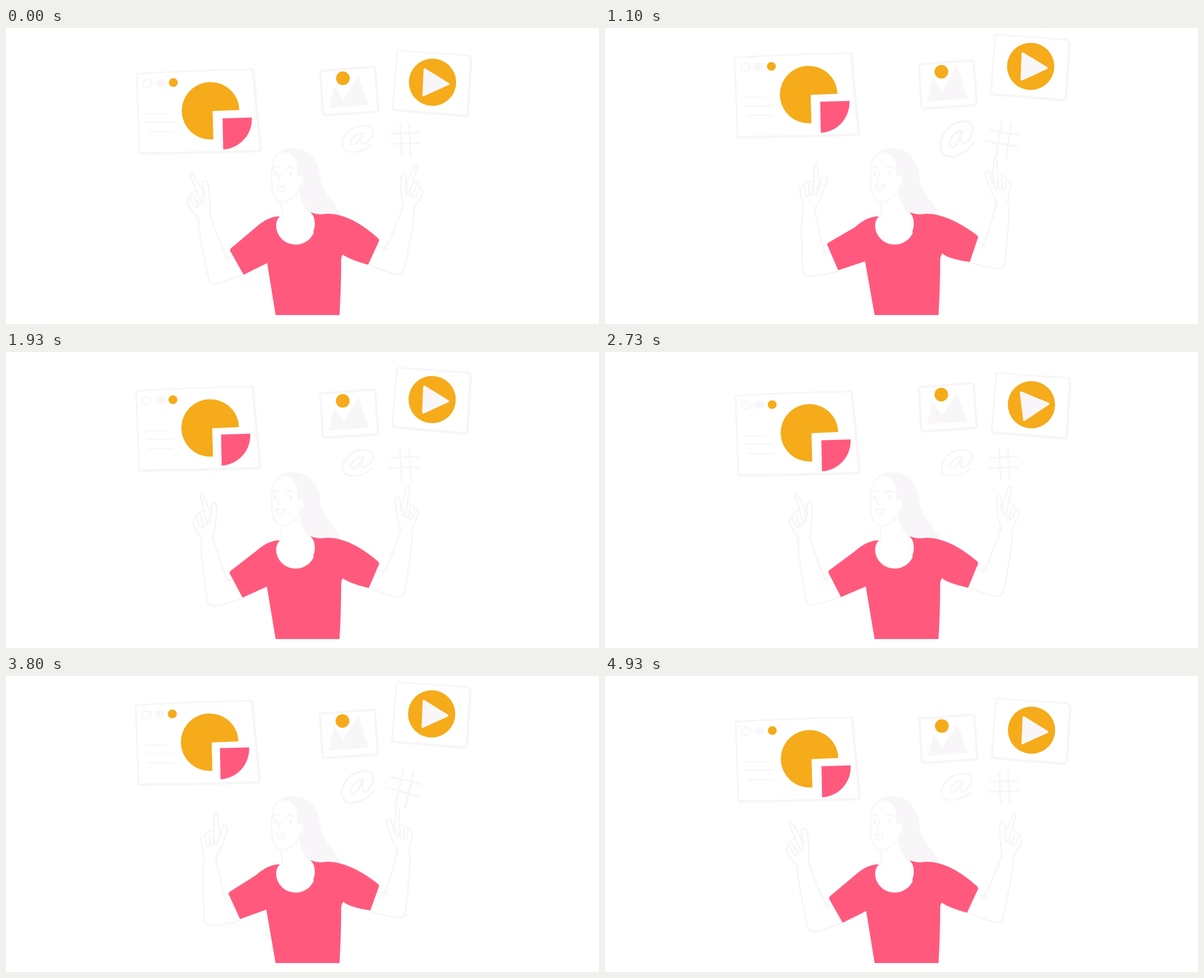
These frames come from a looping animation (1058 by 529 pixels, 5010 ms). An HTML page:

```html
<!DOCTYPE html>
<html lang="en">
<head>
<meta charset="utf-8">
<title>Floating media cards</title>
<style>
  html, body { margin: 0; width: 100%; height: 100%; overflow: hidden; background: #fff; }
  svg { display: block; width: 100%; height: 100%; }
  .line { fill: none; stroke: #f7f6f7; stroke-width: 3; stroke-linecap: round; stroke-linejoin: round; }
  .thick { stroke-width: 4.6; }
  .thin { stroke-width: 2.3; }
  .pale { fill: #f8f6f8; }
  .gold { fill: #f5ab1a; }
  .pink { fill: #ff5a7d; }
  .white { fill: #fff; }
</style>
</head>
<body>
<svg viewBox="0 0 1058 529">
  <g id="windowCard">
    <path class="line" d="M233 82L238 223M232 82Q300 77 438 74"/>
    <path class="line thick" d="M438 74Q441 74 441 78L454 214Q456 220 449 220L330 223L239 224"/>
    <ellipse class="line thin" cx="252" cy="99" rx="8" ry="7"/>
    <ellipse class="pale" cx="276" cy="98" rx="8.5" ry="7.5"/>
    <ellipse class="gold" cx="298.5" cy="97.5" rx="8" ry="7.7"/>
    <path class="line thin" d="M250 153H288M252 168H299M257 185H299"/>
    <path class="gold" d="M416.3 146.5A51.3 51.3 0 1 0 370 199L368.5 148.5Z"/>
    <path id="wedge" class="pink" d="M386.5 161.5L438.5 160A54 54 0 0 1 387.5 217Z"/>
  </g>

  <g id="imageCard">
    <path class="line" style="stroke-width:4" d="M561 77L652 70Q658 69 659 75L664 146Q664 150 660 150L570 156Q566 156 565 150Z"/>
    <path id="peaks" class="pale" d="M-35 2L-25-36L-9-13L18-54L36-3Z"/>
    <circle class="gold" cx="601" cy="90" r="12.2"/>
  </g>

  <g id="playCard">
    <path class="line" d="M690 144L698 42Q700 39 710 41L825 49"/>
    <path class="line thick" d="M824 49Q830 51 830 58L824 153Q823 158 817 157L695 147Q690 146 691 141"/>
    <circle class="gold" cx="761" cy="97" r="42.2"/>
    <path id="play" d="M28 3L-14-23L-16 23Z" fill="#f8f6f8" stroke="#f8f6f8" stroke-width="4" stroke-linejoin="round"/>
  </g>

  <path id="at" class="line" d="M11-9C3-14-12-2-13 6C-13 13-4 11 0 5C4-1 8-8 10-10C7-2 4 8 9 9C16 9 26-2 27-12C27-25 4-26-10-18C-26-8-32 10-24 19C-16 28 12 23 24 10"/>
  <path id="hash" class="line" d="M-8-28L-5 28M8-29L11 28M-23-12L25-14M-26 6L26 5"/>

  <g id="leftArm" class="line">
    <g id="forearm">
      <path d="M-29-100Q-26-70-20-44Q-15-15-10 4Q-7 13 2 12Q20 9 52-5"/>
      <path d="M-8-110Q-3-92 5-75Q15-50 20-41L28-30M19-33L34-38"/>
    </g>
    <g id="leftHand">
      <g id="hand">
        <path d="M10-49L11-76Q14-90 17-77L20-36L24-54Q28-63 33-58Q36-55 30-42Q24-22 16-9Q11 0 11 6"/>
        <path d="M10-49Q2-53-5-46Q-15-42-15-32Q-12-18-10-10L-9 0"/>
        <path id="fingers"/>
      </g>
    </g>
  </g>
  <g id="rightArm" class="line">
    <use href="#forearm"/>
    <g id="rightHand"><use href="#hand"/></g>
  </g>

  <path class="pale" d="M474 248Q475 224 500 216Q528 211 547 230Q561 247 561 272Q566 291 583 311L599 336L558 335L540 330Q527 318 523 288Z"/>
  <path class="white" d="M475 247Q480 225 497 222Q511 223 518 238Q520 250 520 262L528 262L532 280L523 287Q518 302 505 309L488 310Q476 304 474 270Z"/>
  <g class="line thin">
    <path d="M475 245Q473 270 475 287Q477 304 487 309Q506 316 524 288"/>
    <path d="M520 264Q526 258 533 264Q535 274 530 281Q526 286 522 281M491 313L493 338"/>
    <path d="M477 251Q481 246 487 249M500 251Q506 246 514 251M489 261Q486 266 485 271Q487 274 490 272"/>
    <path id="mouth"/>
  </g>
  <ellipse class="pale" cx="481" cy="260" rx="2.6" ry="4"/>
  <ellipse class="pale" cx="508" cy="259.5" rx="2.8" ry="4.2"/>

  <path id="shirt" class="pink"/>
  <path class="line thin" d="M489 338Q483 344 483 353A34 33 0 0 0 517 386A34 35 0 0 0 548 366"/>
</svg>
<script>
  const el = id => document.getElementById(id);
  const move = (id, transform) => el(id).setAttribute('transform', transform);

  // Sum of cosine bumps from 0 to 1 and back, each spanning its centre ± half.
  const bumps = (t, half, ...centres) => centres.reduce((sum, c) => {
    const x = Math.min(1, Math.abs(t - c) / half);
    return sum + (1 + Math.cos(Math.PI * x)) / 2;
  }, 0);

  function drawFingers() {
    let d = '';
    for (let i = 0; i < 3; i++) {
      const x = -6 + 7.5 * i, y = -42 - 2 * i;
      d += `M${x} ${y}q0 19 4 20q4 0 3-14`;
    }
    el('fingers').setAttribute('d', d);
  }

  function drawShirt(lift) {
    const p = (x, y, dx, dy) => `${x + dx * lift} ${y + dy * lift}`;
    el('shirt').setAttribute('d',
      `M490 337Q470 335 446 356L${p(401, 394, -3, -10)}` +
      `Q${p(398, 397, -3, -10)} ${p(402, 402, -4, -11)}L${p(424, 441, -8, -8)}L${p(466, 420, -2, -3)}` +
      `L481 513H595Q598 465 598 415Q598 408 ${p(601, 405, 1, -2)}` +
      `Q${p(613, 414, 0, -1)} ${p(646, 423, 5, -5)}L${p(665, 382, 0, -6)}` +
      `Q${p(667, 379, 0, -6)} ${p(663, 375, 0, -5)}Q627 343 596 335Q580 330 563 333Q552 333 543 329` +
      `Q551 336 551 350A34 36 0 0 1 517 386A34 33 0 0 1 483 353Q483 343 490 337Z`);
  }

  function drawMouth(smile) {
    const w = 7 + 1.3 * smile;
    el('mouth').setAttribute('d', `M${490 - w} ${283 - 3 * smile}q${w} 2.5 ${2 * w} 0q-1 10 ${-w} 10.5q${1 - w}-1.5 ${-w}-10.5Z`);
  }

  // side is 1 for the left arm and -1 for its mirror image.
  function drawArm(name, side, x, y, turn, wrist, size) {
    move(name + 'Arm', `translate(${x} ${y}) scale(${side} 1) rotate(${turn})`);
    move(name + 'Hand', `translate(-19 -105) rotate(${wrist}) scale(${size})`);
  }

  function draw(t) {
    const win = bumps(t, 1.25, 1.25, 3.72);
    const image = bumps(t, .9, .83, 2.6, 4.17);
    const video = bumps(t, 1.25, 1.25, 3.75);
    const wedge = bumps(t, .5, .5, 1.5, 2.3, 3.5, 4.5);
    const grow = bumps(t, .5, .5, 1.5, 2.5, 4.45);
    const at = bumps(t, .8, 1.05, 4.15);
    const hash = bumps(t, .8, .8, 3.8);
    const swing = 1.04 * bumps(t, 1.2, 1.25, 3.55);
    const lift = bumps(t, 1.2, 1.15, 3.45);

    move('windowCard', `translate(${-1.7 * win} ${-30 * win})`);
    move('wedge', `translate(${-9 * wedge} ${-7.8 * wedge})`);
    move('imageCard', `translate(${-1.1 * image} ${-15 * image})`);
    move('peaks', `translate(611 141) scale(1 ${1 + .16 * video})`);
    move('playCard', `translate(${-1.6 * video} ${-29.4 * video})`);
    move('play', `translate(761 97) rotate(${-3 * grow - 8.5 * bumps(t, .6, 2.65)}) scale(${1 + .12 * grow})`);
    move('at', `translate(628 198) rotate(${-13 * at}) scale(${1 + .18 * at} ${1 + .24 * at})`);
    move('hash', `translate(${711 - 2 * hash} 201) rotate(${16 * hash}) scale(${1 + .16 * hash})`);

    drawArm('left', 1, 372 - 9 * lift, 445 - 14 * lift, 10 * swing, 16 * swing - 26, 1);
    drawArm('right', -1, 700 + 3 * lift, 428 - 10 * lift, 6.5 * swing, 12.5 * swing - 19, .95);
    drawShirt(lift);
    drawMouth(Math.min(1, 5 * bumps(t, 2.2, 2.2)));
  }

  // Steps alternate between 30 and 70 ms, each advancing the pose by 50 ms.
  function tick() {
    const ms = performance.now() % 5010;
    const step = Math.min(99, 2 * Math.floor(ms / 100) + (ms % 100 >= 30 ? 1 : 0));
    draw(step * .05);
    requestAnimationFrame(tick);
  }

  drawFingers();
  tick();
</script>
</body>
</html>
```
